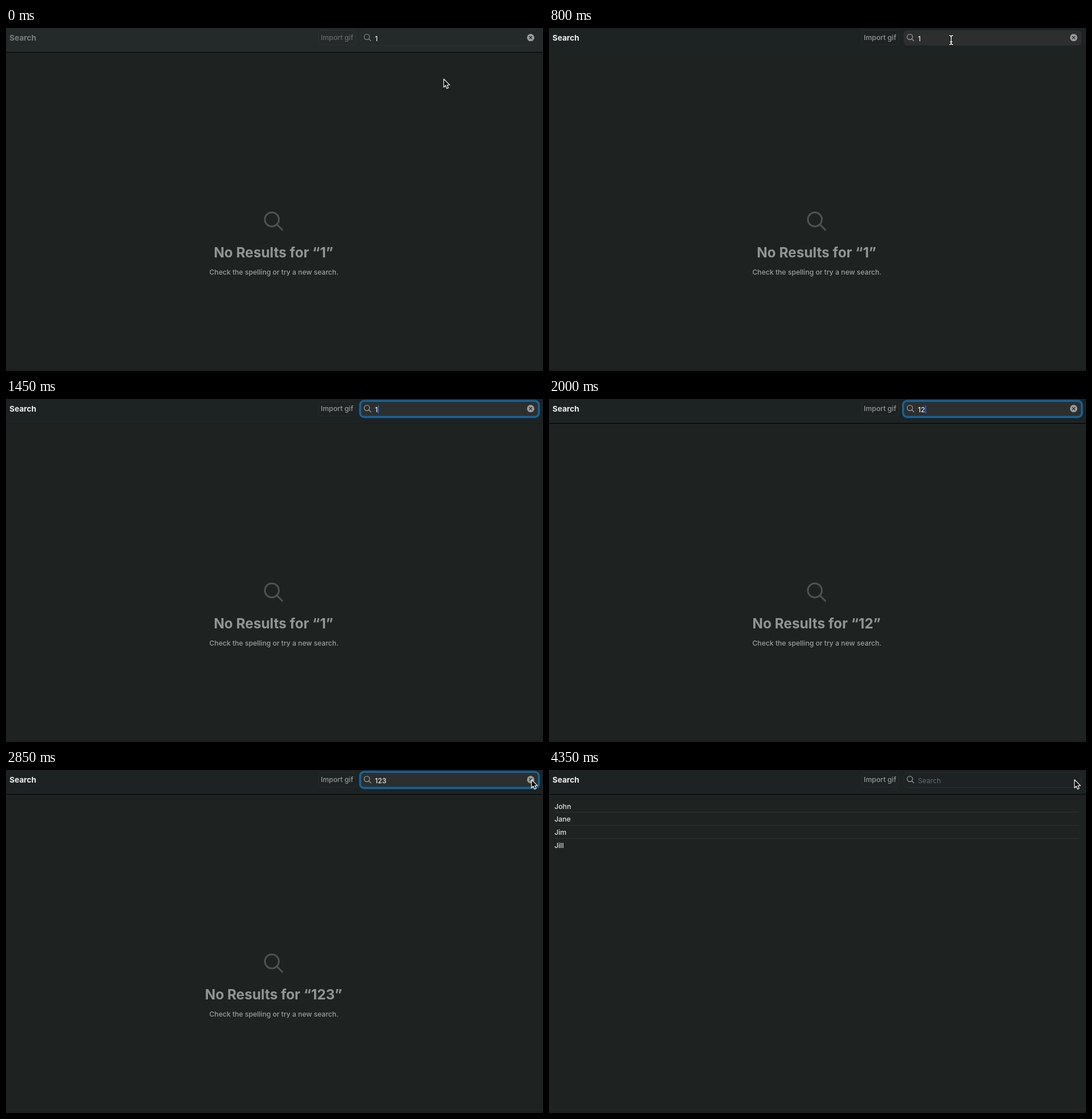
Write an HTML page with a canvas that moves like this. It is 936 by 598 pixels and loops after 4.4 s.

```html
<!DOCTYPE html>
<html lang="en">
<head>
<meta charset="utf-8">
<title>Search</title>
<style>
html, body { margin: 0; width: 100%; height: 100%; overflow: hidden; background: #1e2322; }
canvas { display: block; width: 936px; height: 598px; }
</style>
</head>
<body>
<canvas id="stage" width="936" height="598"></canvas>
<script>
const ctx = document.getElementById('stage').getContext('2d');
const LOOP = 4400;
const ACTIVATE = 600, FOCUS = 1200, HIDE_POINTER = 1400;
const TYPE_TWO = 1600, TYPE_THREE = 2150, SHOW_POINTER = 2500, CLEAR = 3050;

const clamp = v => Math.max(0, Math.min(1, v));
const progress = (t, from, to) => clamp((t - from) / (to - from));
const ease = p => p * p * (3 - 2 * p);
const mix = (a, b, p) => a + (b - a) * p;
const gray = (v, alpha = 1) => `rgba(${v},${v + 3},${v + 2},${alpha})`;

function text(str, x, y, size, weight, color, align = 'left') {
  ctx.font = `${weight} ${size}px Inter, sans-serif`;
  ctx.textAlign = align;
  ctx.fillStyle = color;
  ctx.fillText(str, x, y);
}

function box(x, y, w, h, r, fill, stroke, width = 1) {
  ctx.beginPath();
  ctx.roundRect(x, y, w, h, r);
  if (fill) { ctx.fillStyle = fill; ctx.fill(); }
  if (stroke) { ctx.strokeStyle = stroke; ctx.lineWidth = width; ctx.stroke(); }
}

function magnifier(cx, cy, r, handle, width, color) {
  const d = r * Math.SQRT1_2;
  ctx.strokeStyle = color;
  ctx.lineWidth = width;
  ctx.lineCap = 'round';
  ctx.beginPath();
  ctx.arc(cx, cy, r, 0, Math.PI * 2);
  ctx.moveTo(cx + d, cy + d);
  ctx.lineTo(cx + d + handle, cy + d + handle);
  ctx.stroke();
}

function clearButton() {
  ctx.fillStyle = gray(154);
  ctx.beginPath();
  ctx.arc(914.5, 16.7, 6.4, 0, Math.PI * 2);
  ctx.fill();
  ctx.strokeStyle = gray(42);
  ctx.lineWidth = 1.3;
  ctx.beginPath();
  for (const s of [-1, 1]) {
    ctx.moveTo(914.5 - 2.2, 16.7 - 2.2 * s);
    ctx.lineTo(914.5 + 2.2, 16.7 + 2.2 * s);
  }
  ctx.stroke();
}

function arrow(x, y) {
  const points = [[0, 0], [0, 14.2], [3.2, 11.2], [5.4, 16.4], [8, 15.3], [5.8, 10.3], [10.2, 10.2]];
  ctx.beginPath();
  for (const [dx, dy] of points) ctx.lineTo(x + dx, y + dy);
  ctx.closePath();
  ctx.fillStyle = '#000';
  ctx.strokeStyle = '#fff';
  ctx.lineWidth = 1.2;
  ctx.lineJoin = 'round';
  ctx.fill();
  ctx.stroke();
}

function iBeam(x, y) {
  ctx.lineCap = 'round';
  for (const [color, width] of [['#111', 3.6], ['#f4f4f4', 1.5]]) {
    ctx.strokeStyle = color;
    ctx.lineWidth = width;
    ctx.beginPath();
    ctx.moveTo(x - 3, y - 8);
    ctx.quadraticCurveTo(x, y - 8, x, y - 5);
    ctx.lineTo(x, y + 5);
    ctx.quadraticCurveTo(x, y + 8, x - 3, y + 8);
    ctx.moveTo(x + 3, y - 8);
    ctx.quadraticCurveTo(x, y - 8, x, y - 5);
    ctx.moveTo(x, y + 5);
    ctx.quadraticCurveTo(x, y + 8, x + 3, y + 8);
    ctx.moveTo(x - 2, y + 3);
    ctx.lineTo(x + 2, y + 3);
    ctx.stroke();
  }
}

function header(t, active) {
  ctx.fillStyle = active ? '#1d2222' : '#242929';
  ctx.fillRect(0, 0, 936, 42);
  const lineAlpha = active ? progress(t, 1350, 1900) : 1;
  ctx.fillStyle = `rgba(0,0,0,${lineAlpha})`;
  ctx.fillRect(0, 42, 936, 1);
  text('Search', 6, 22, 13.6, 700, gray(active ? 238 : 122));
  box(544.5, 4.5, 65, 25, 5, null, gray(active ? 40 : 46));
  text('Import gif', 577, 21, 12.2, 500, gray(active ? 150 : 104), 'center');
}

function searchField(t, query, active) {
  const filled = active && t < CLEAR;
  box(618, 4, 310, 26.5, 6, filled ? gray(44) : null);
  if (!filled) box(618.5, 4.5, 309, 26, 6, null, gray(43));
  const ring = progress(t, FOCUS - 50, FOCUS + 50) * (1 - progress(t, CLEAR - 50, CLEAR + 100));
  if (ring > 0) box(617.2, 3.2, 311.6, 28.2, 7, null, `rgba(20,99,153,${ring})`, 3.6);
  magnifier(629, 15.6, 4.7, 3.6, 1.3, gray(active ? 152 : 128));

  if (!query) {
    text('Search', 643, 22.5, 12.1, 400, gray(105));
    return;
  }
  text(query, 643, 22.5, 12.2, 500, gray(230));
  const caretX = 643 + ctx.measureText(query).width;
  if (t >= FOCUS && t < SHOW_POINTER) {
    ctx.fillStyle = '#1668d8';
    ctx.fillRect(caretX, 11, 1.8, 14);
  }
  clearButton();
}

function emptyState(query) {
  magnifier(463.4, 333.8, 12.2, 9.6, 3, gray(79));
  text(`No Results for “${query}”`, 466.3, 400, 24.2, 700, gray(146), 'center');
  text('Check the spelling or try a new search.', 467, 429.5, 12.1, 500, gray(154), 'center');
}

function nameList() {
  ['John', 'Jane', 'Jim', 'Jill'].forEach((name, i) => {
    const y = 67.5 + i * 22.85;
    text(name, 9.5, y, 12.2, 500, gray(226));
    if (i < 3) {
      ctx.fillStyle = gray(46);
      ctx.fillRect(10, 73 + i * 23, 914, 1);
    }
  });
}

function pointer(t) {
  if (t < ACTIVATE) {
    const p = ease(progress(t, 0, 550));
    arrow(mix(763, 701, p), mix(89, 18, p));
  } else if (t < HIDE_POINTER) {
    iBeam(701, 21);
  } else if (t >= SHOW_POINTER) {
    const p = ease(progress(t, SHOW_POINTER, 2800));
    const x = mix(701, 916, p);
    if (x < 905) iBeam(x, mix(21, 17, p));
    else arrow(x, 17);
  }
}

function draw(t) {
  const active = t >= ACTIVATE;
  const query = t >= CLEAR ? '' : t >= TYPE_THREE ? '123' : t >= TYPE_TWO ? '12' : '1';
  ctx.fillStyle = '#1e2322';
  ctx.fillRect(0, 0, 936, 598);
  ctx.fillStyle = '#1d1f1f';
  ctx.fillRect(0, 594, 936, 4);
  header(t, active);
  searchField(t, query, active);
  if (query) emptyState(query);
  else nameList();
  pointer(t);
}

function tick() {
  draw(Math.floor((performance.now() % LOOP) / 50) * 50);
  requestAnimationFrame(tick);
}
tick();
</script>
</body>
</html>
```
